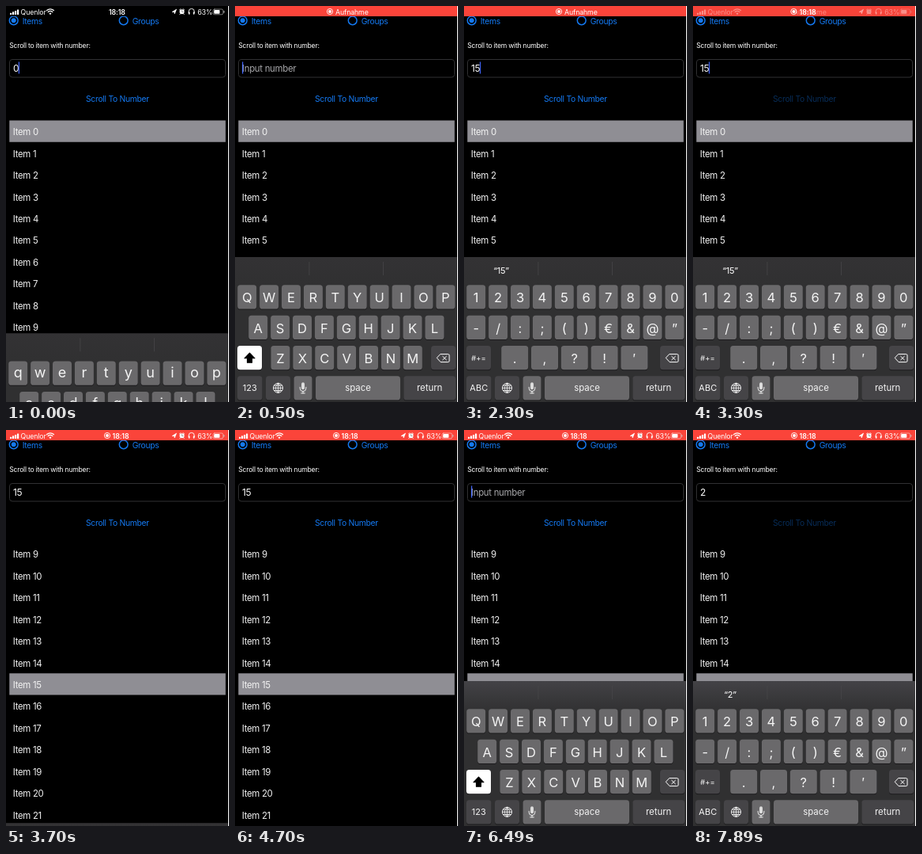
Write an HTML page with a canvas that moves like this. It is 282 px wide and 500 px high and loops after 8 s.

```html
<!DOCTYPE html>
<html lang="en">
<head>
<meta charset="utf-8">
<title>Scroll to item</title>
<style>
html, body { margin: 0; width: 100%; height: 100%; overflow: hidden; background: #000; }
canvas { display: block; width: 282px; height: 500px; }
</style>
</head>
<body>
<canvas id="stage"></canvas>
<script>
const W = 282, H = 500, LOOP = 8000;
const BLUE = '#1479f2', KEY = '#6a696b', DARK_KEY = '#454447';
const KB_TOP = 317, KB_H = H - KB_TOP, ROW_H = 27.45, LIST_TOP = 144, BAR_H = 13;
const canvas = document.getElementById('stage');
const ctx = canvas.getContext('2d');
const dpr = window.devicePixelRatio || 1;
canvas.width = W * dpr;
canvas.height = H * dpr;

const clamp = v => Math.max(0, Math.min(1, v));
const easeOut = p => 1 - (1 - p) ** 2;
const smooth = p => p * p * (3 - 2 * p);
const span = (t, start, length) => clamp((t - start) / length);

function stepTime(t) {
  if (t < 100) return 0;
  const start = t < 6490 ? 100 : 6490;
  return start + 200 * Math.floor((t - start) / 200);
}

// [start, value] pairs
const EDITS = [[0, '0'], [500, ''], [1900, '1'], [2300, '15'], [4800, '15'], [5900, '1'], [6100, ''], [7290, '2']];
const LAYOUTS = [[0, 'lower'], [500, 'upper'], [1300, 'digits'], [3900, 'lower'], [6100, 'upper'], [6890, 'digits']];
const latest = (list, t) => list.filter(e => e[0] <= t).pop();

function keyboardOffset(t) {
  if (t < 3400) return KB_H * (1 - easeOut(span(t, -82.5, 300)));
  if (t < 4790) return KB_H * easeOut(span(t, 3400, 350));
  return KB_H * (1 - easeOut(span(t, 4790, 300)));
}

function text(str, x, y, size, color, { align = 'left', weight = 400, track = -0.026 } = {}) {
  ctx.font = `${weight} ${size}px Inter, sans-serif`;
  ctx.letterSpacing = `${size * track}px`;
  ctx.textAlign = align;
  ctx.fillStyle = color;
  ctx.fillText(str, x, y);
}

function rect(x, y, w, h, color, r = 0) {
  ctx.fillStyle = color;
  ctx.beginPath();
  ctx.roundRect(x, y, w, h, r);
  ctx.fill();
}

function disc(x, y, r, color) {
  ctx.fillStyle = color;
  ctx.beginPath();
  ctx.arc(x, y, r, 0, 7);
  ctx.fill();
}

function ring(x, y, r, color, width) {
  ctx.strokeStyle = color;
  ctx.lineWidth = width;
  ctx.beginPath();
  ctx.arc(x, y, r, 0, 7);
  ctx.stroke();
}

function line(d, color, width, fill) {
  const path = new Path2D(d);
  ctx.strokeStyle = color;
  ctx.lineWidth = width;
  ctx.lineJoin = ctx.lineCap = 'round';
  if (fill) { ctx.fillStyle = color; ctx.fill(path); }
  ctx.stroke(path);
}

function outline(x, y, w, h, r, color, width) {
  ctx.strokeStyle = color;
  ctx.lineWidth = width;
  ctx.beginPath();
  ctx.roundRect(x, y, w, h, r);
  ctx.stroke();
}

function at(x, y, draw) {
  ctx.save();
  ctx.translate(x, y);
  draw();
  ctx.restore();
}

function faded(alpha, draw) {
  if (alpha <= 0) return;
  ctx.save();
  ctx.globalAlpha *= alpha;
  draw();
  ctx.restore();
}

function radio(x, label, on) {
  ring(x, 18.3, 5.4, BLUE, 1.5);
  if (on) disc(x, 18.3, 3, BLUE);
  text(label, x + 11, 22.6, 10.3, BLUE);
}

function input(t) {
  outline(4.5, 67.5, 273, 22.5, 3.5, '#303032', 1);
  const [since, value] = latest(EDITS, t);
  if (value) text(value, 9, 82.6, 12, '#fff');
  else text('Input number', 9, 82.5, 11.4, '#a6a6a9');
  const focused = t < 3400 || t >= 4800;
  if (focused && (t - since) % 1000 < 550) {
    const x = value ? 8.5 + ctx.measureText(value).width : 9;
    rect(x, 70.5, 1.3, 15, '#3f62f0');
  }
}

function list(t, bottom) {
  const scroll = 249 * smooth(span(t, 3350, 300));
  const selected = t < 3350 ? 0 : 15;
  ctx.save();
  ctx.beginPath();
  ctx.rect(0, LIST_TOP, W, bottom - LIST_TOP);
  ctx.clip();
  for (let i = 0; i < 24; i++) {
    const y = LIST_TOP + 0.4 + i * ROW_H - scroll;
    if (i === selected) rect(4.3, y, 273.4, ROW_H, '#8f8e94');
    text(`Item ${i}`, 8.7, y + 18.8, 11.4, '#f4f4f4');
  }
  ctx.restore();
}

function statusText(str, x, weight = 400) {
  text(str, x, 10.6, 8.8, '#fff', { weight, track: -0.015 });
}

function recordIcon(x) {
  ring(x, 7, 3.6, '#fff', 0.9);
  disc(x, 7, 2, '#fff');
}

function statusIcons() {
  for (let i = 0; i < 4; i++) rect(5 + i * 3, 8.7 - i * 1.4, 2.2, 2.3 + i * 1.4, '#fff', 0.5);
  statusText('Quenlor', 18.6);
  line('M51.6 5.6Q56 2 60.4 5.6M53.2 7.6Q56 5.3 58.8 7.6', '#fff', 1.3);
  disc(56, 9.6, 1.2, '#fff');
  line('M210.5 7.4L215.5 4.2L213.2 9.8L212.8 7.5Z', '#fff', 0.8, true);
  disc(222.5, 7.3, 3, '#fff');
  line('M219.4 5L221 3.7M224 3.7L225.6 5M220.4 9.8L219.8 10.6M224.6 9.8L225.2 10.6', '#fff', 0.9);
  line('M222.5 5.6V7.5H224', '#777', 0.7);
  line('M231 9V7A3.6 3.6 0 0 1 238.2 7V9', '#fff', 0.9);
  line('M231.7 8V10M237.5 8V10', '#fff', 1.5);
  statusText('63%', 242.2);
  outline(262, 4, 12.5, 6.8, 1.8, 'rgba(255,255,255,.65)', 0.7);
  rect(263.1, 5.1, 7.2, 4.6, '#fff', 1);
  rect(275.4, 6, 1, 2.8, '#bbb', 0.5);
}

function statusBar(t) {
  rect(0, 0, W, BAR_H, '#000');
  const red = span(t, 300, 200);
  const idle = 1 - red;
  const back = span(t, 3140, 400);
  // The recording bar breathes slightly darker.
  const breath = ((1 + Math.cos((t - 5100) / 1050 * 2 * Math.PI)) / 2) ** 2;
  faded(red * (1 - 0.14 * breath), () => rect(0, 0, W, BAR_H, '#fc453b'));
  faded(idle, () => statusText('18:18', 130, 600));
  faded(Math.max(idle, back), statusIcons);
  faded(red * (1 - back) ** 2, () => statusText('Aufnahme', 127));
  faded(red, () => recordIcon(120 + 8 * clamp(back * 2.3)));
  faded(clamp(back * 2.5), () => statusText('18:18', 134.6, 600));
}

function key(x, y, w, color, label, size = 16.5, dy = 21.8) {
  rect(x, y + 1, w, 30.3, '#1b1a1c', 3.6);
  rect(x, y, w, 30.3, color, 3.6);
  if (label) text(label, x + w / 2, y + dy, size, '#f4f4f4', { align: 'center', track: 0 });
}

function keyRow(chars, first, y, pitch, width, size, dy) {
  [...chars].forEach((c, i) => key(first + i * pitch - width / 2, y, width, KEY, c, size, dy));
}

function keyboard(t) {
  const layout = latest(LAYOUTS, t)[1];
  const bg = ctx.createLinearGradient(0, KB_TOP, 0, KB_TOP + 40);
  bg.addColorStop(0, t > 4000 ? '#434246' : '#333234');
  bg.addColorStop(1, '#303031');
  rect(0, KB_TOP, W, KB_H, bg);
  for (const x of [93.5, 187]) rect(x, 323, 0.8, 17, '#474649');

  const value = latest(EDITS, t)[1];
  if (layout === 'digits' && value) text(`“${value}”`, 47, 338, 11, '#fff', { align: 'center' });

  const rows = {
    lower: ['qwertyuiop', 'asdfghjkl', 'zxcvbnm'],
    upper: ['QWERTYUIOP', 'ASDFGHJKL', 'ZXCVBNM'],
    digits: ['1234567890', '-/:;()€&@”', '.,?!′']
  }[layout];
  const digits = layout === 'digits', upper = layout === 'upper';
  const size = layout === 'lower' ? 18 : 16.5;
  const dy = layout === 'lower' ? 21 : 21.8;
  keyRow(rows[0], 15.2, 352.3, 27.9, 24, size, dy);
  keyRow(rows[1], digits ? 15.2 : 29.2, 390.7, 27.9, 24, size, dy);
  keyRow(rows[2], digits ? 64.2 : 57.4, 429, digits ? 37.8 : 27.9, digits ? 34 : 24, size, dy);

  key(3, 429, 31, upper ? '#fff' : DARK_KEY, digits ? '#+=' : '', 9.4, 18.6);
  if (!digits) {
    at(18.5, 444.6, () => line('M0 -6.5L6.5 .2H3V5.6H-3V.2H-6.5Z', upper ? '#000' : '#fff', 1.1, upper));
  }
  key(248, 429, 31, DARK_KEY);
  at(263.5, 444.6, () => line('M-3.5 -5H6Q7.5 -5 7.5 -3.5V3.5Q7.5 5 6 5H-3.5L-8 0ZM-.8 -2.2L3.8 2.2M3.8 -2.2L-.8 2.2', '#fff', 1));

  key(3, 467.2, 31.5, DARK_KEY, digits ? 'ABC' : '123', 11, 19);
  key(39, 467.2, 31, DARK_KEY);
  at(54.5, 482.3, () => {
    ring(0, 0, 6, '#fff', 0.9);
    line('M0 -6V6M-6 0H6M-5 -3.2H5M-5 3.2H5M0 -6C-4 -3 -4 3 0 6C4 3 4 -3 0 -6', '#fff', 0.8);
  });
  key(74.5, 467.2, 23, KEY);
  at(86, 482.3, () => {
    rect(-2, -7, 4, 9, '#ddd', 2);
    line('M-3.8 -1V.5A3.8 3.8 0 0 0 3.8 .5V-1M0 4.4V6.6M-2.3 6.6H2.3', '#fff', 0.9);
  });
  key(102, 467.2, 107, KEY, 'space', 11.4, 18.8);
  key(213.3, 467.2, 65.7, DARK_KEY, 'return', 11.4, 18.8);
}

function draw(t) {
  ctx.setTransform(dpr, 0, 0, dpr, 0, 0);
  rect(0, 0, W, H, '#000');
  radio(9.7, 'Items', true);
  radio(148.7, 'Groups', false);
  text('Scroll to item with number:', 4.3, 53, 8.6, '#fff');
  input(t);
  const pressed = (t >= 3200 && t < 3450) || t >= 7850;
  faded(pressed ? 0.36 : 1, () => text('Scroll To Number', 141, 121.3, 10.3, BLUE, { align: 'center' }));
  const offset = keyboardOffset(t);
  list(t, KB_TOP + offset);
  if (offset < KB_H) at(0, offset, () => keyboard(t));
  statusBar(t);
  rect(W - 1, 0, 1, H, '#fff');
}

function tick() {
  draw(stepTime(performance.now() % LOOP));
  requestAnimationFrame(tick);
}
tick();
</script>
</body>
</html>
```
